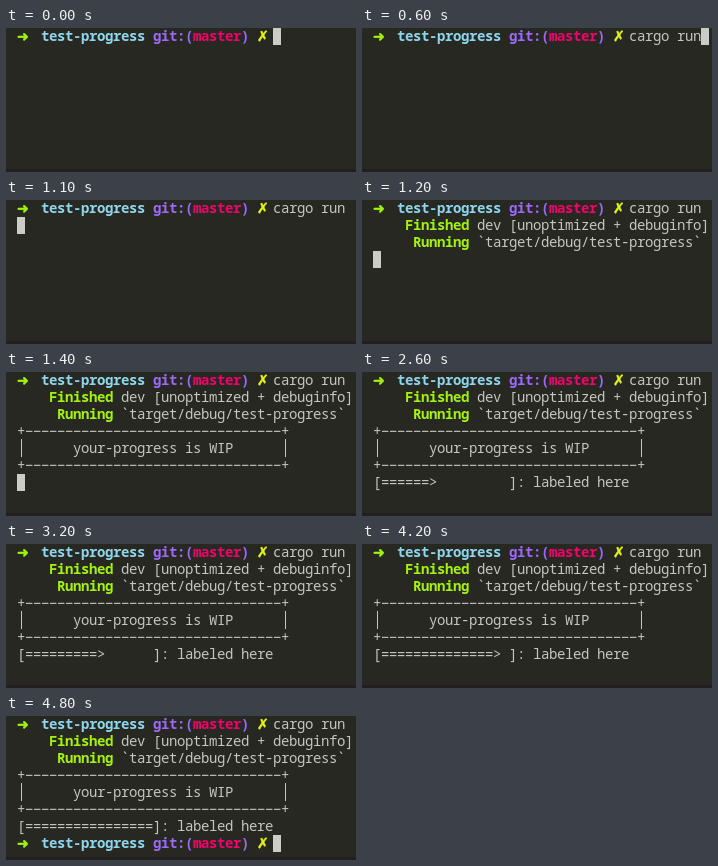
Write an HTML page with a canvas that moves like this. It is 350x144 px and loops after 5.8 s.

```html
<!DOCTYPE html>
<html lang="en">
<head>
<meta charset="utf-8">
<title>Terminal progress bar</title>
<style>
  html, body { margin: 0; width: 100%; height: 100%; overflow: hidden; background: #272822; }
  canvas { display: block; }
</style>
</head>
<body>
<canvas id="stage" width="350" height="144"></canvas>
<script>
const ctx = document.getElementById("stage").getContext("2d");
const LOOP = 5800;
const CELL = 8, LINE = 17, LEFT = 11, BASELINE = 13;
const MONO = '14px "Noto Sans Mono", monospace';
const SYMBOL = 'bold 14px "DejaVu Sans", sans-serif';
const COLORS = {
  background: "#272822", edge: "#231e1f", text: "#c6c6c0", cursor: "#cbcbc7",
  green: "#a2f20c", cyan: "#8dd6f0", purple: "#9d68fb", pink: "#f0046c", yellow: "#e2f41c"
};
const BAR_WIDTH = 16;
const RULE = "+" + "\u2212".repeat(32) + "+";

// Terminal text: one character per grid cell.
function write(col, row, text, color = COLORS.text, font = MONO) {
  ctx.font = font;
  ctx.fillStyle = color;
  [...text].forEach((char, i) =>
    ctx.fillText(char, LEFT + (col + i) * CELL, row * LINE + BASELINE));
}

function bold(col, row, text, color) {
  write(col, row, text, color, "bold " + MONO);
}

function symbol(col, row, char, color) {
  write(col, row, char, color, SYMBOL);
  ctx.strokeStyle = color;
  ctx.lineWidth = 0.6;
  ctx.strokeText(char, LEFT + col * CELL, row * LINE + BASELINE);
}

function cursor(col, row) {
  ctx.fillStyle = COLORS.cursor;
  ctx.fillRect(LEFT + col * CELL, row * LINE, CELL, LINE);
}

function verticalBar(col, row) {
  ctx.fillStyle = COLORS.text;
  ctx.fillRect(LEFT + col * CELL + 4, row * LINE - 1, 1, LINE + 1);
}

function prompt(row) {
  symbol(0, row, "➜", COLORS.green);
  bold(3, row, "test-progress", COLORS.cyan);
  bold(17, row, "git:(", COLORS.purple);
  bold(22, row, "master", COLORS.pink);
  bold(28, row, ")", COLORS.purple);
  symbol(30, row, "✗", COLORS.yellow);
}

function buildOutput() {
  bold(4, 1, "Finished", COLORS.green);
  write(13, 1, "dev [unoptimized + debuginfo]");
  bold(5, 2, "Running", COLORS.green);
  write(13, 2, "`target/debug/test-progress`");
}

function banner() {
  write(0, 3, RULE);
  verticalBar(0, 4);
  write(7, 4, "your-progress is WIP");
  verticalBar(33, 4);
  write(0, 5, RULE);
}

function progressBar(time) {
  let step = Math.min(BAR_WIDTH, Math.floor((time - 1200) / 200));
  if (step % 5 === 4) step--; // every fifth update is skipped
  const fill = step < BAR_WIDTH ? "=".repeat(step - 1) + ">" : "=".repeat(BAR_WIDTH);
  write(0, 6, `[${fill.padEnd(BAR_WIDTH)}]: labeled here`);
}

function draw(time) {
  ctx.fillStyle = COLORS.background;
  ctx.fillRect(0, 0, 350, 144);
  ctx.fillStyle = COLORS.edge;
  ctx.fillRect(0, 141, 350, 3);

  prompt(0);
  if (time >= 600) write(32, 0, "cargo run");
  if (time >= 1200) buildOutput();
  if (time >= 1400) banner();
  if (time >= 1500) progressBar(time);
  if (time >= 4800) prompt(7);

  if (time < 600) cursor(32, 0);
  else if (time < 1100) cursor(41, 0);
  else if (time < 1200) cursor(0, 1);
  else if (time < 1400) cursor(0, 3);
  else if (time < 1500) cursor(0, 6);
  else if (time >= 4800) cursor(32, 7);
  else if (time >= 4600) cursor(0, 7);
}

function tick() {
  draw(performance.now() % LOOP);
  requestAnimationFrame(tick);
}
tick();
</script>
</body>
</html>
```
